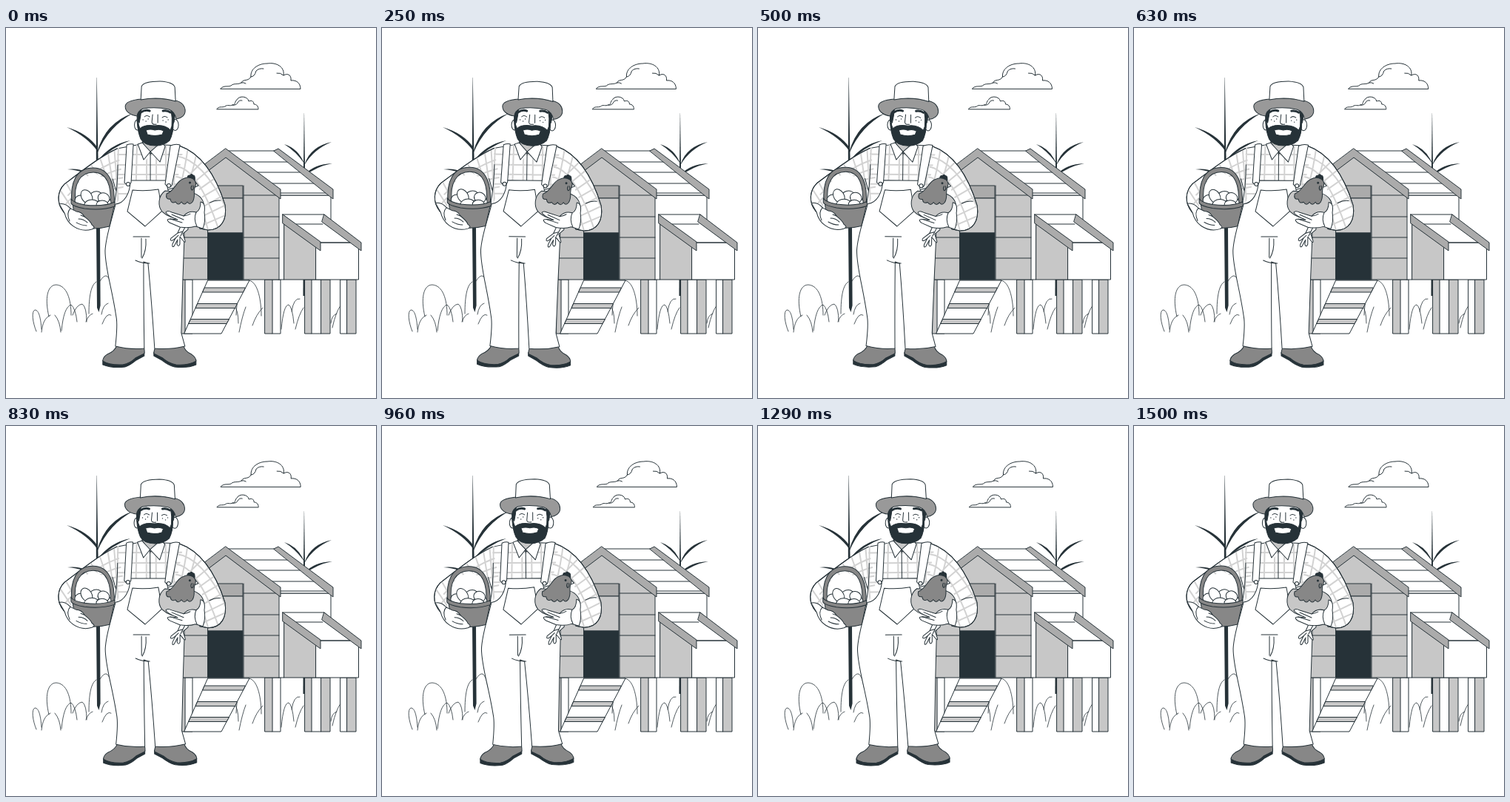
These frames come from a looping animation (500 px wide and 500 px high, 1.54 s). An HTML page:

```html
<!DOCTYPE html>
<html lang="en">
<head>
<meta charset="utf-8">
<title>Farmer with hen</title>
<style>
html, body { margin: 0; width: 100%; height: 100%; overflow: hidden; background: #fff; }
svg { display: block; width: 100vw; height: 100vh; }
.l { stroke: #263238; stroke-width: 1; stroke-linejoin: round; stroke-linecap: round; fill: none; }
.w { fill: #fff; }
.g1 { fill: #c7c7c7; }
.g2 { fill: #ababab; }
.g3 { fill: #999; }
.g4 { fill: #878787; }
.d { fill: #263238; }
.plaid path { stroke: #d2d2d2; stroke-width: 2; fill: none; }
</style>
</head>
<body>
<svg viewBox="0 0 500 500" xmlns="http://www.w3.org/2000/svg">
<defs>
  <clipPath id="armL"><path d="M150 163C127 174 108 189 79 211C69 221 68 237 78 249L88 246L90 215L118 195L144 210L150 238L160 212Z"/></clipPath>
  <clipPath id="armR"><path d="M234 159C268 171 286 207 296 239C299 259 291 273 273 273L262 271L268 235L255 205L235 207L228 213Z"/></clipPath>
  <clipPath id="chest"><path d="M150 162L177 158L189 179L195 168L208 182L214 159L240 162L230 215L150 238Z"/></clipPath>
</defs>

<g id="clouds" class="l">
  <path class="w" d="M290 82C294 77 300 80 304 78C308 74 313 77 318 74C321 68 327 73 331 66C330 55 341 48 353 48C366 46 377 53 375 64C382 60 386 65 385 71C392 70 398 74 398 82Z"/>
  <path d="M318 74Q321 73 324 75M331 66Q336 66 338 58Q342 54 348 55M366 61Q371 60 375 64"/>
  <path class="w" d="M285 109.500C288 105 292 108 296 106C299 103 303 106 306 104C310 105 309 99 312 97C315 91 327 92 328 99C333 97 335 100 335 103C339 103 341 106 341 109.500Z"/>
  <path d="M306 104Q311 105 313 101Q315 97 319 98"/>
</g>

<g class="d">
  <path d="M122.500 67H122.800L124.300 165L127 270L127.600 375L125.500 384L123 378L122 270L121.800 165Z"/>
  <path d="M82 134Q110 142 124 162V167Q110 147 82 134Z"/>
  <path d="M123.500 167Q134 128 172 115Q139 133 124 168Z"/>
  <path d="M123.500 180Q141 157 168 152Q143 161 124 181Z"/>
  <path d="M83 191Q108 188 123 207Q107 192 83 191Z"/>
  <path d="M402.800 115H403L404 185V362H401.500L402 185Z"/>
  <path d="M376 157Q395 163 403 183Q392 167 376 157Z"/>
  <path d="M404 183Q412 160 440 154Q416 164 404 184Z"/>
  <path d="M404 198Q416 184 441 183Q420 187 405 199Z"/>
</g>

<g class="l" style="stroke-width:.8">
  <path d="M41 410C36 398 34 383 39 381C45 381 47 394 48 407M48 411C49 399 53 391 60 388M58 390C52 365 56 347 68 347C82 348 88 366 88 388M74 411Q73 396 66 388M75 409Q78 377 88 374Q94 379 96 397M90 388Q95 374 103 373Q109 377 109 397M108 397Q111 388 117 386M112 386C112 362 115 347 122 343M127 342Q132 334 136 335Q141 338 143 353M129 387Q131 374 138 372M130 400Q136 384 142 388"/>
  <path d="M300 394Q303 376 308 376Q314 380 314 399M311 388C312 363 318 342 328 341C341 343 345 370 345 389M315 411Q319 390 324 377M333 402Q338 387 347 378"/>
  <path d="M372 407Q375 374 382 374Q387 377 389 399M386 383Q389 364 397 366M391 407Q396 386 402 378M439 399Q440 388 447 386M441 405Q446 382 453 374"/>
</g>

<g class="l" id="coop">
  <path class="w" d="M242 340H252V413H242ZM360 340H371V413H360ZM413 340H426V413H413ZM452 340H461V413H452Z"/>
  <path class="g1" d="M236 340H242V413H236ZM350 340H360V413H350ZM404 340H413V413H404ZM426 340H438V413H426ZM461 340H473V413H461Z"/>
  <path class="w" d="M273 341H329L291 413H241Z"/>
  <path class="g1" d="M268.500 351H323.500L320.500 357H266ZM259 372.500H312.500L309.500 378.500H256.500ZM250 393.500H301.500L298 399.500H247Z"/>
  <path class="w" d="M368 226H439V262H376V340H368Z"/>
  <path class="w" d="M297 166H367L440 226H370Z"/>
  <path d="M318 181H386M337 195H405M357 210H424M371 223H438"/>
  <path class="g2" d="M362 166L368 163L442 218V231L438 228Z"/>
  <path class="g1" d="M297 174L369 229V340H238V219Z"/>
  <path d="M321 226H366M321 255H369M321 283H369M321 311H369M240 255H273M240 283H273M240 311H273M321 213V340M273 222V340"/>
  <path class="g2" d="M283 213H320V230H273V222Z"/>
  <path class="g1" d="M273 230H320V277H273Z"/>
  <path class="d" d="M273 277H320V340H273Z"/>
  <path class="g2" d="M297 163L371 218V231L297 175L236 221V209Z"/>
  <path class="g1" d="M376 262L419 295V340H376Z"/>
  <path class="w" d="M419 290H476.500V340H419ZM374 252H430L472 290H425Z"/>
  <path d="M392 265H428"/>
  <path class="g2" d="M374 252L425 289V301L374 264ZM430 252L480 290V301L427 262Z"/>
</g>

<g id="man" class="l">
  <!-- shoes -->
  <path class="d" d="M131 449L131 455Q143 460 161 458Q168 456 176 449L187 443V438Z"/>
  <path class="g4" d="M150 429Q147 437 137 441Q131 445 131 450Q140 456 158 455Q168 453 175 446L187 440Q188 436 186 430Z"/>
  <path class="d" d="M200 438V443L211 449Q220 456 228 458Q246 460 257 455V449Z"/>
  <path class="g4" d="M202 431Q200 436 200 440L212 446Q220 453 230 455Q247 456 257 450Q257 445 251 441Q242 437 240 429Z"/>
  <!-- shirt -->
  <path class="w" d="M177 158L150 163C127 174 108 189 79 211C69 221 68 237 78 249L90 262H150V238L230 215L262 271L273 273C291 273 299 259 296 239C286 207 268 171 234 159L214 158Z"/>
  <g class="plaid">
    <g clip-path="url(#chest)"><path d="M145 171H240M145 185H240M145 198H240M145 211H240M145 224H240M152 155L149 240M177 155L175 240M190 155V240M203 155V240M216 155V240M229 155L226 240"/></g>
    <g clip-path="url(#armL)"><path d="M146 160L152 238M137 164L145 215M126 173L139 211M113 182L127 204M102 190L115 205M91 198L102 214M80 207L94 232M71 216L91 246M66 231L82 254M158 177Q120 188 84 226M162 189Q114 199 78 241M161 202Q122 205 83 250M158 215L130 220"/></g>
    <g clip-path="url(#armR)"><path d="M246 160Q242 190 235 215M258 165Q255 185 247 208M230 173Q267 178 299 247M230 187Q260 190 288 274M230 201Q254 203 274 276M250 196L272 174M256 207L281 186M261 218L289 198M264 229L296 210M265 242L301 222M264 255L303 236M264 267L303 250"/></g>
  </g>
  <path d="M150 163C127 174 108 189 79 211C69 221 68 237 78 249M234 159C268 171 286 207 296 239C299 259 291 273 273 273L262 271M151 185Q151 215 146 240M144 204L149 221M290 233Q283 232 275 236"/>
  <path class="g1" d="M184 154H211L205 166L195 170Z"/>
  <path class="w" d="M178 157L186 178L195 167L184 155ZM195 167L208 181L215 160L210 154Z"/>
  <path d="M195 168V206"/>
  <!-- overalls -->
  <path class="w" d="M168 206H217C218 224 225 240 240 247L241 283L239 340L237 412L242 430Q222 435 201 433Q197 370 192 318L186 316Q186 370 187 433Q168 435 148 430C150 412 151 400 149 390C143 350 134 325 134 301C135 280 143 260 148 238C160 237 168 223 168 206Z"/>
  <path d="M175 314Q183 318 194 318M172 282H194M183 284V310M189 285Q190 301 184 311"/>
  <path class="w" d="M171 219Q188 221 206 218L211 247L188 268L164 248Z"/>
  <path class="w" d="M163 158Q168 156 172 157L169 209Q164 214 160 209ZM222 159Q229 156 235 158L224 213Q220 218 215 211Z"/>
  <circle class="w" cx="165" cy="211" r="2.500"/><circle class="w" cx="220" cy="213" r="2.500"/>
  <!-- basket -->
  <path class="g4" fill-rule="evenodd" d="M89 238C86 207 96 189 118 189C140 189 148 212 146 240H141C143 212 136 195 118 195C100 195 91 211 94 235Z"/>
  <g class="w">
    <ellipse cx="101" cy="233" rx="8" ry="7"/><ellipse cx="134" cy="236" rx="8" ry="7"/>
    <ellipse cx="121" cy="228" rx="9" ry="7" transform="rotate(-18 121 228)"/>
    <ellipse cx="109" cy="228" rx="7" ry="10" transform="rotate(-32 109 228)"/>
    <ellipse cx="132" cy="230" rx="8" ry="7" transform="rotate(25 132 230)"/>
    <ellipse cx="116" cy="239" rx="10" ry="7"/><ellipse cx="130" cy="239" rx="8" ry="6"/>
  </g>
  <path class="g4" d="M90 238L95 268Q118 274 140 268L146 241Q118 248 90 238Z"/>
  <path class="g4" d="M88 231Q90 236 106 239Q132 242 147 235V241Q130 247 106 244Q90 241 88 237Z"/>
  <path class="w" d="M72 238Q80 236 87 244L95 248Q102 248 106 255Q115 262 116 266Q122 270 116 272Q103 276 91 268Q82 262 79 250Z"/>
  <path d="M87 244Q81 250 86 261M98 258Q105 258 110 263M95 263Q102 267 109 267M106 255L101 253"/>
  <!-- hen -->
  <path class="w" d="M236 268L232 277L223 284Q221 288 225 287L229 284L225 292Q224 297 227 295L232 286L231 292Q233 297 235 292L235 282L240 288Q243 291 242 287L239 278L246 272L246 268Z"/>
  <path d="M242 269L236 281M232 277L239 275M229 284L233 280"/>
  <path class="g1" d="M215 220C205 227 205 241 211 248Q222 259 245 258Q263 256 267 244C269 233 262 226 253 223Z"/>
  <path class="d" d="M245 203Q245 198 249 199Q250 196 253 199Q256 199 255 206L248 207Z"/>
  <path class="w" d="M256 208L260 213L255 215Z"/>
  <path class="g4" d="M239 204Q246 200 253 204Q258 208 256 213C252 221 257 227 252 235Q248 240 245 235Q241 241 237 235Q233 241 229 235Q223 238 222 231Q215 232 217 224C228 220 230 207 239 204Z"/>
  <circle class="d" cx="248.500" cy="209" r="1"/>
  <path d="M253 213Q254 219 251 219Q249 216 251 213"/>
  <path class="w" d="M263 235Q270 236 268 249Q270 261 266 271L256 268Q247 271 235 269L221 263Q215 258 222 258L232 259Q217 253 216 249Q218 246 224 249L240 254Q247 246 257 249Q263 246 263 235Z"/>
  <path d="M257 249Q253 258 258 268M222 258L238 263M224 252L240 259M240 254Q246 253 249 251"/>
  <!-- head -->
  <ellipse class="w" cx="177.500" cy="131" rx="4" ry="7"/><ellipse class="w" cx="228.500" cy="131" rx="4.500" ry="7.500"/>
  <path class="w" d="M179 106H227L225 139Q222 155 202 157Q181 155 179 137Z"/>
  <path class="d" d="M177 108H183Q182 119 180 128L177 126ZM223 112H229L227 127L224 132Q225 122 223 112Z"/>
  <path class="d" d="M177 126L181 136Q187 130 201 132Q214 130 222 138L226 127Q226 143 221 152Q213 159 202 159Q187 159 182 150Q178 141 177 126Z"/>
  <path class="w" d="M189 138Q195 136 201 138Q208 136 213 139L211 144Q201 147 191 144Z"/>
  <path d="M198 117L197 127Q197 131 203 130M205 117V128M187 120Q190 117 194 120M211 121Q214 118 218 121"/>
  <path d="M182 114Q188 110 194 112M212 112Q218 111 222 114" style="stroke-width:3"/>
  <g class="d" stroke="none"><circle cx="185" cy="124" r=".7"/><circle cx="189" cy="126" r=".7"/><circle cx="192" cy="123" r=".7"/><circle cx="212" cy="125" r=".7"/><circle cx="216" cy="127" r=".7"/><circle cx="219" cy="124" r=".7"/></g>
  <!-- hat -->
  <path class="g3" d="M161 106C161 100 172 97 183 96Q206 93 229 98C238 100 242 106 242 112C242 118 237 122 230 123Q228 113 220 110Q202 106 185 109Q178 112 177 119C168 118 161 113 161 106Z"/>
  <path class="w" d="M182 97L183 79Q186 72 208 72Q226 73 228 80L229 99Q206 92 182 97Z"/>
</g>
</svg>
<script>
const LOOP = 1540;
const man = document.getElementById('man');
const clouds = document.getElementById('clouds');

// Linear swing: 0, up to 1 at a quarter, down to -1 at three quarters, back to 0
function swing(t) {
  const p = ((t + 20) / LOOP) % 1;
  if (p < .25) return p * 4;
  return p < .75 ? 2 - p * 4 : p * 4 - 4;
}

function draw(t) {
  const s = swing(t);
  man.setAttribute('transform', `rotate(${s.toFixed(4)} 188 257)`);
  clouds.setAttribute('transform', `translate(${(-.8 * s).toFixed(3)} 0)`);
}

const start = performance.now();
function tick() {
  draw(performance.now() - start);
  requestAnimationFrame(tick);
}
draw(0);
requestAnimationFrame(tick);
</script>
</body>
</html>
```
